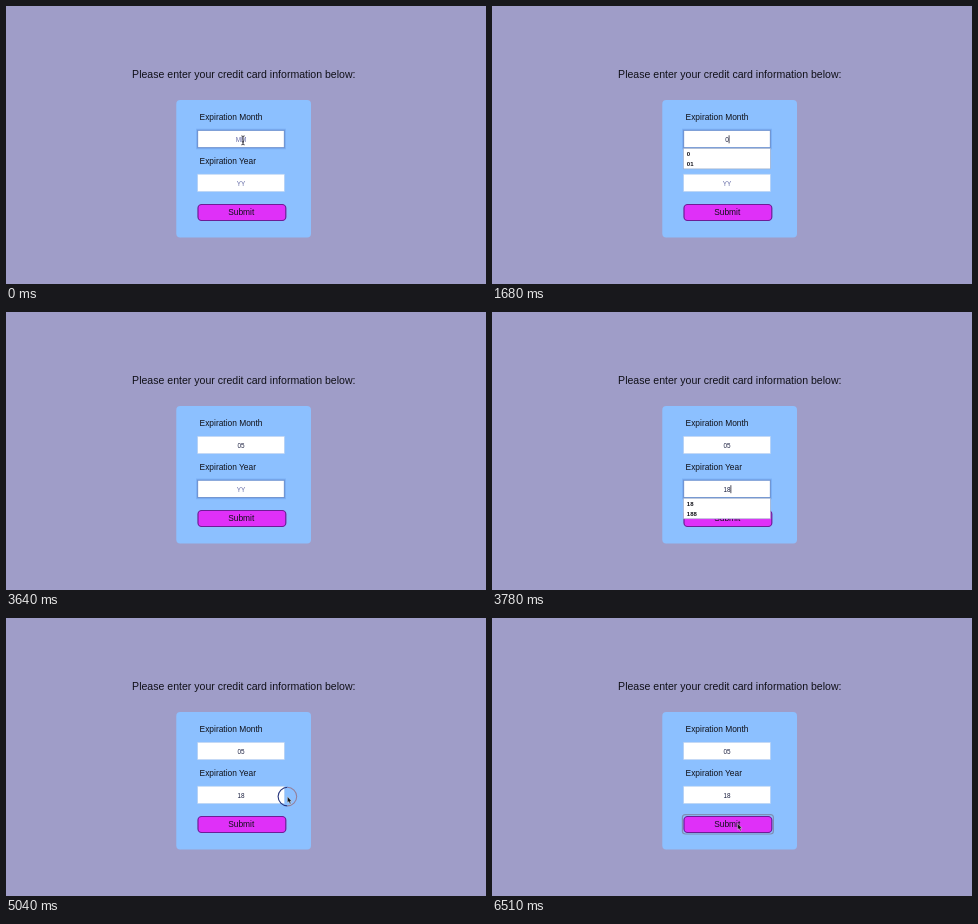
Animation, 480 px wide and 278 px high, one loop 6.72 s. Source, as an HTML page:

```html
<!DOCTYPE html>
<html lang="en">
<head>
<meta charset="utf-8">
<title>Card form</title>
<style>
html, body { margin: 0; width: 100%; height: 100%; overflow: hidden; background: #9f9dc8; }
svg { display: block; width: 100vw; height: 100vh; }
text { font: 8.4px "Liberation Sans", Arial, sans-serif; fill: #101018; }
.mid { text-anchor: middle; }
.title { font-size: 10.55px; }
.value { font-size: 6.4px; }
.list text { font-size: 6px; font-weight: bold; }
.box { fill: #fff; stroke: #b4cdf0; stroke-width: .6; }
.focus .box { stroke: #6f93d0; stroke-width: 1.1; }
.glow { fill: none; stroke: #6fa3ee; stroke-width: 1.6; opacity: 0; }
.focus .glow { opacity: .6; }
.caret { stroke: #223; stroke-width: .8; }
.list rect { fill: #fff; stroke: #9aa8c4; stroke-width: .6; }
.ring { fill: none; stroke-width: 1.1; }
</style>
</head>
<body>
<svg viewBox="0 0 480 278" preserveAspectRatio="none">
  <text class="title mid" x="237.8" y="72.3">Please enter your credit card information below:</text>
  <rect x="170.3" y="94" width="134.7" height="137.6" rx="4" fill="#8cc0ff"/>
  <text x="193.6" y="114">Expiration Month</text>
  <text x="193.6" y="157.8">Expiration Year</text>
  <rect id="halo" x="190.4" y="196.6" width="91" height="19.4" rx="3" fill="none" stroke="#7f8fb4" stroke-width="1.2"/>
  <rect x="192" y="198.5" width="87.8" height="16" rx="3.6" fill="#df30f8" stroke="#6d1d96" stroke-width="1.2"/>
  <text class="mid" x="235.2" y="209.2">Submit</text>
  <g id="fields"></g>
  <g id="ring" class="ring">
    <path d="M0-9.3A9.3 9.3 0 0 0 0 9.3"/>
    <path d="M0-9.3A9.3 9.3 0 0 1 0 9.3" stroke="#94809c"/>
  </g>
  <path id="beam" d="M-1.6-4.4Q0-4.4 0-3.4Q0-4.4 1.6-4.4M0-3.4V3.6M-1.6 4.5Q0 4.5 0 3.6Q0 4.5 1.6 4.5M-1 1.6H1" fill="none" stroke="#22222e" stroke-width=".9"/>
  <path id="arrow" d="M0 0V6.2L1.4 5L2.5 7.4L3.6 6.9L2.6 4.6H4.4Z" fill="#111" stroke="#fff" stroke-width=".4"/>
</svg>
<script>
const LOOP = 6720, STEP = 70, BLINK = 560;
const $ = id => document.getElementById(id);

function makeField(y, options) {
  const g = document.createElementNS("http://www.w3.org/2000/svg", "g");
  const items = options.map((o, i) => `<text x="194.8" y="${y + 25.6 + i * 10.1}">${o}</text>`).join("");
  g.innerHTML = `
    <rect class="glow" x="190.9" y="${y - .8}" width="88.2" height="19"/>
    <rect class="box" x="191.6" y="${y}" width="86.8" height="17.4"/>
    <text class="value mid" x="235" y="${y + 11.5}"></text>
    <path class="caret"/>
    <g class="list"><rect x="191.4" y="${y + 18}" width="87" height="20.6"/>${items}</g>`;
  $("fields").append(g);
  return { g, y, text: g.querySelector(".value"), caret: g.querySelector(".caret"), list: g.querySelector(".list") };
}

const month = makeField(124.3, ["0", "01"]);
const year = makeField(168.2, ["18", "188"]);

const show = (el, on) => { el.style.display = on ? "" : "none"; };
const between = (t, a, b) => t >= a && t < b;

// since: last moment the caret was reset to visible
function drawField(f, value, hint, focused, since, open, t) {
  f.g.setAttribute("class", focused ? "focus" : "");
  f.text.textContent = value || hint;
  f.text.style.fill = value ? "#1c2040" : "#6268a4";
  const on = Math.floor((t - since) / BLINK) % 2 === 0;
  const x = 235.3 + value.length * 1.78;
  f.caret.setAttribute("d", `M${x} ${f.y + 5}v8`);
  show(f.caret, focused && on);
  show(f.list, open);
}

// pointer legs: start, end, from, to
const MONTH = [237, 134.3], YEAR = [237, 180], SIDE = [281.4, 178.6], NEAR = [248, 203], BUTTON = [245.6, 205.6];
const legs = [
  [1960, 2590, MONTH, YEAR],
  [4200, 4830, YEAR, SIDE],
  [5180, 5600, SIDE, NEAR],
  [5810, 5950, NEAR, BUTTON]
];

function pointer(t) {
  let p = MONTH;
  for (const [a, b, from, to] of legs) {
    if (t < a) break;
    const u = Math.min(1, (t - a) / (b - a)), e = u * u * (3 - 2 * u);
    p = from.map((v, i) => v + (to[i] - v) * e);
  }
  return p;
}

function draw(t) {
  const m = t < 1610 ? "" : t < 1750 ? "0" : "05";
  const y = t < 3710 ? "" : t < 3780 ? "1" : "18";
  drawField(month, m, "MM", t < 2730, t < 1610 ? -840 : t < 1750 ? 1610 : 1750, m === "0", t);
  drawField(year, y, "YY", between(t, 2730, 4970), t < 3710 ? 2730 : 3780 - (t < 3780 ? STEP : 0), between(t, 3710, 4970), t);

  const [px, py] = pointer(t);
  const inField = px < 278.5 && (between(py, 124, 142) || between(py, 168, 186));
  const seen = t < 630 || between(t, 2030, 3150) || t >= 4270;
  const place = `translate(${px} ${py})`;
  const { beam, arrow, ring } = { beam: $("beam"), arrow: $("arrow"), ring: $("ring") };
  beam.setAttribute("transform", place);
  arrow.setAttribute("transform", place);
  show(beam, seen && inField);
  show(arrow, seen && !inField);

  const click = t < 6000 ? 4970 : 6160;
  ring.setAttribute("transform", `${place} scale(${t < click + STEP ? .6 : 1})`);
  ring.firstElementChild.setAttribute("stroke", click === 4970 ? "#27357c" : "#94809c");
  show(ring, between(t, click, click + 2 * STEP));
  show($("halo"), t >= 6160);
}

const start = performance.now();
function tick() {
  const t = (performance.now() - start) % LOOP;
  draw(Math.floor(t / STEP) * STEP);
  requestAnimationFrame(tick);
}
tick();
</script>
</body>
</html>
```
